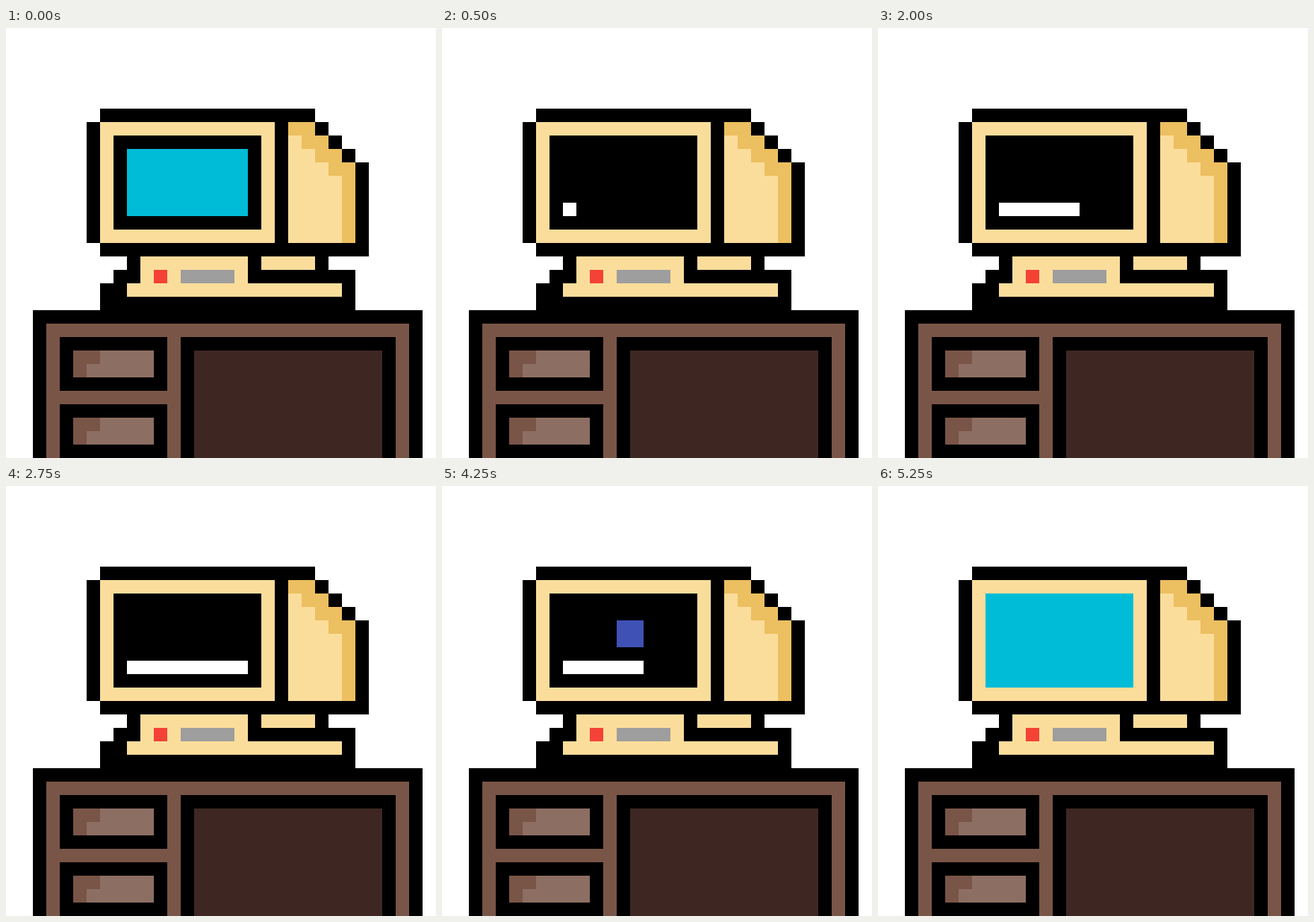
These frames come from a looping animation (576x576 px, 5.35 s). An HTML page:

```html
<!DOCTYPE html>
<html lang="en">
<head>
<meta charset="utf-8">
<title>Desktop computer</title>
<style>
  html, body { margin: 0; width: 100%; height: 100%; overflow: hidden; background: #fff; }
  svg { display: block; width: 100vw; height: 100vh; }
</style>
</head>
<body>
<svg viewBox="0 0 32 32" shape-rendering="crispEdges">
  <g id="scene"></g>
  <g id="screen"></g>
</svg>
<script>
const LOOP = 5350;
const BLACK = '#000', WHITE = '#fff', CYAN = '#00bcd7', BLUE = '#3f51b5', RED = '#f44336';
const CREAM = '#fbdd9b', TAN = '#ecbf60', GREY = '#9e9e9e';
const WOOD = '#795548', PANEL = '#8d6e63', DARK = '#3e2723';

// All positions are in cells of a 32 x 32 grid.
const rect = (fill, x, y, w, h) =>
  `<rect x="${x}" y="${y}" width="${w}" height="${h}" fill="${fill}"/>`;

function drawer(y) {
  return rect(BLACK, 4, y, 8, 4) + rect(PANEL, 5, y + 1, 6, 2) +
    rect(WOOD, 5, y + 1, 2, 1) + rect(WOOD, 5, y + 2, 1, 1);
}

function monitor() {
  let s = rect(BLACK, 7, 6, 16, 1) + rect(BLACK, 6, 7, 1, 9) +
    rect(BLACK, 7, 16, 20, 1) + rect(CREAM, 7, 7, 13, 9) +
    rect(BLACK, 8, 8, 11, 7) + rect(BLACK, 20, 7, 1, 9);
  // Sloped side: each row is one cell wider until the back is straight.
  for (let i = 0; i < 9; i++) {
    const end = Math.min(23 + i, 26);
    const shade = i < 4 ? 2 : 1;
    s += rect(CREAM, 21, 7 + i, end - 21, 1) +
      rect(TAN, end - shade, 7 + i, shade, 1) + rect(BLACK, end, 7 + i, 1, 1);
  }
  return s;
}

function base() {
  return rect(BLACK, 9, 17, 15, 1) + rect(BLACK, 8, 18, 18, 1) +
    rect(BLACK, 7, 19, 19, 2) + rect(CREAM, 10, 17, 8, 2) +
    rect(CREAM, 19, 17, 4, 1) + rect(CREAM, 9, 19, 16, 1) +
    rect(RED, 11, 18, 1, 1) + rect(GREY, 13, 18, 4, 1);
}

function desk() {
  return rect(BLACK, 2, 21, 29, 11) + rect(WOOD, 3, 22, 27, 10) +
    drawer(23) + drawer(28) +
    rect(BLACK, 13, 23, 16, 9) + rect(DARK, 14, 24, 14, 8);
}

// Cells inside the display, as [column, row, step of arrival].
const trails = [
  [[0, 0, 0], [1, 1, 1], [2, 1, 2], [3, 1, 3]],
  [[8, 0, 0], [7, 1, 1], [6, 1, 2], [5, 1, 3]],
  [[8, 4, 0], [7, 3, 1], [6, 2, 2], [5, 2, 3]],
  [[2, 3, 1], [3, 2, 2], [4, 2, 2]]
].flat();

const bar = n => rect(WHITE, 9, 13, n, 1);

function display(t) {
  if (t < 500) return Math.floor(t / 100) % 2 ? '' : rect(CYAN, 9, 9, 9, 5);
  if (t >= 5250) return rect(CYAN, 8, 8, 11, 7);
  if (t < 3000) return bar(Math.max(1, Math.floor((t - 500) / 250)));

  const step = Math.floor((t - 3000) / 250);
  const art = step > 3
    ? rect(BLUE, 13, 10, 2, 2)
    : trails.filter(c => c[2] <= step && step - c[2] < 3)
        .map(([x, y]) => rect(BLUE, 9 + x, 9 + y, 1, 1)).join('');
  return art + bar(step + 1);
}

document.getElementById('scene').innerHTML = monitor() + base() + desk();

const screen = document.getElementById('screen');
const start = performance.now();
let shown = null;

function update(now) {
  const next = display(Math.max(0, now - start) % LOOP);
  if (next !== shown) screen.innerHTML = shown = next;
  requestAnimationFrame(update);
}
update(start);
</script>
</body>
</html>
```
